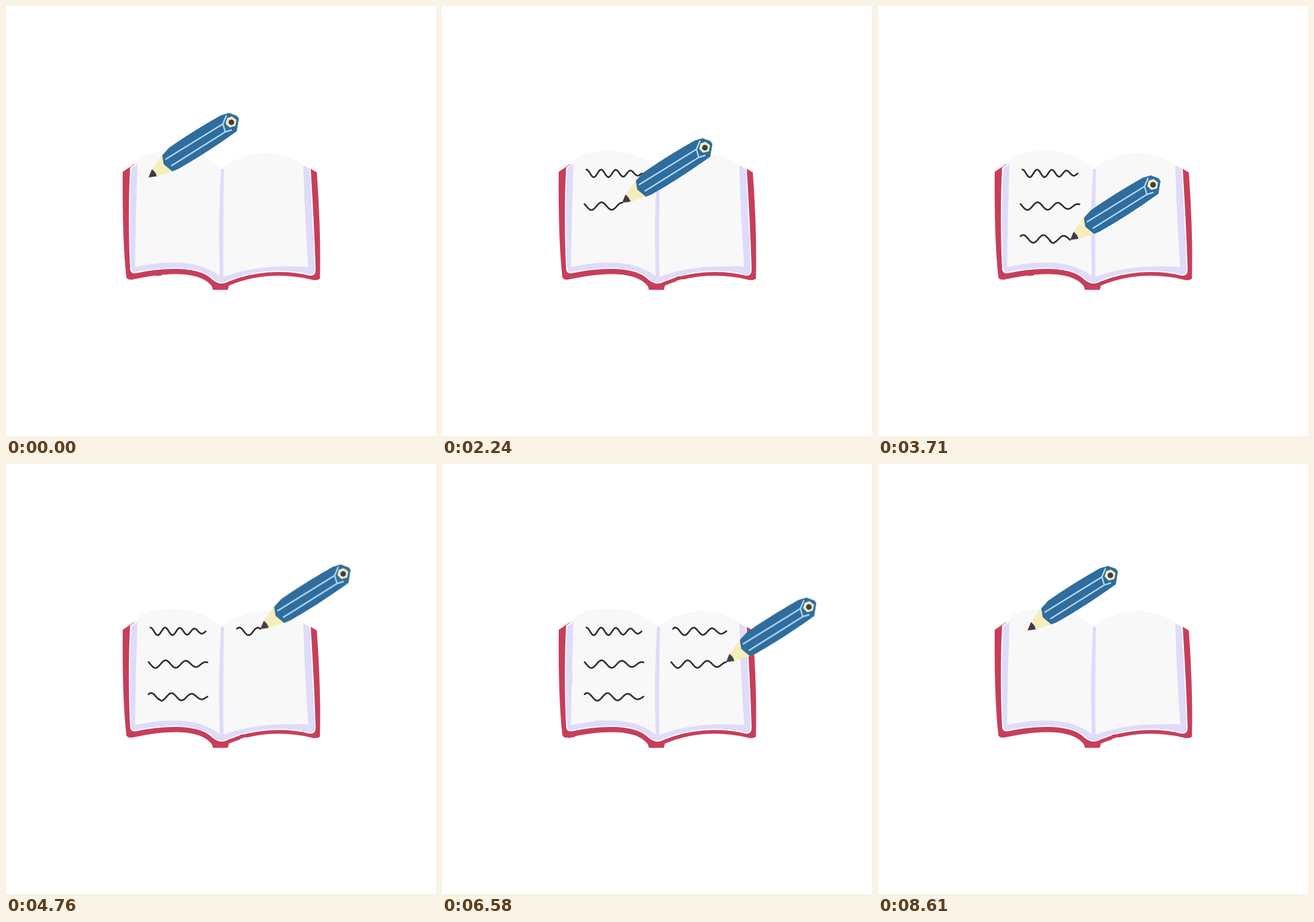
Write an HTML page that moves like this. It is 700 px wide and 700 px high and loops after 8.68 s.

```html
<!DOCTYPE html>
<html lang="en">
<head>
<meta charset="utf-8">
<title>Writing in a notebook</title>
<style>
  html, body { margin: 0; width: 100%; height: 100%; overflow: hidden; background: #fff; }
  svg { display: block; width: 100vw; height: 100vh; }
  .cover { fill: #c73e5b; }
  .edges { fill: #dfdbf9; stroke: #fff; stroke-width: 4; paint-order: stroke; stroke-linejoin: round; }
  .page { fill: #f9f8f8; }
  .ink { fill: none; stroke: #332d31; stroke-width: 2.7; stroke-linecap: round; stroke-linejoin: round; }
  .wood { fill: #f6edbc; }
  .lead { fill: #423b45; }
  .paint { fill: #2e6d9e; stroke: #2e6d9e; stroke-width: 1; stroke-linejoin: round; }
  .shine { fill: none; stroke: #b3d6ef; stroke-width: 2.4; stroke-linecap: round; stroke-linejoin: round; }
</style>
</head>
<body>
<svg viewBox="0 0 700 700">
  <defs>
    <filter id="boil" filterUnits="userSpaceOnUse" x="0" y="0" width="700" height="700" color-interpolation-filters="sRGB">
      <feTurbulence id="noise" type="fractalNoise" baseFrequency=".03" numOctaves="1"/>
      <feDisplacementMap in="SourceGraphic" scale="2" xChannelSelector="R" yChannelSelector="G"/>
    </filter>
  </defs>
  <g filter="url(#boil)">
    <path class="cover" d="M190 270L209 257L240 300H460L491 262L506 271Q513 370 511 444Q507 447 500 446C450 434 405 438 363 455L361 462H337L335 456C316 431 262 433 207 445Q199 447 196 442Q189 380 190 270Z"/>
    <path class="edges" d="M204 264L214 257L350 265L482 258L494 265Q500 360 502 429Q502 438 495 437C450 426 400 431 361 447Q347 455 334 441C310 422 260 423 211 433Q204 434 204 428Q200 340 204 264Z"/>
    <path class="page" d="M208 262Q215 245 233 240C280 230 325 238 350 265Q345 350 348 440C312 412 262 414 210 425Q211 340 214 257Z"/>
    <path class="page" d="M355 263C385 237 445 228 484 259Q486 340 492 425C445 422 400 424 354 441Q353 350 355 263Z"/>
    <path id="ink" class="ink"/>
    <g id="pencil">
      <path class="wood" d="M12 -8L39 -18L40 14L12 6Z"/>
      <path class="lead" d="M0 0L12 -8Q15 0 12 6Z"/>
      <path class="paint" d="M39 -17L55 -21Q100 -22 154 -18L167 -14L175 -3L175 2L161 17Q100 19 48 15L38 13L33 -4Z"/>
      <path class="shine" d="M40 -9L149 -5L161 -13M149 -5L145 8L155 11M42 5L145 8"/>
      <path class="wood" d="M153 -3L160 -9L168 -7L171 2L164 9L155 6Z"/>
      <circle class="lead" cx="162" cy=".5" r="4.6"/>
    </g>
  </g>
</svg>
<script>
const STEP = 70, STEPS = 124, FLY = 8050, ERASE = 8260;
const HOME = [232, 279], TILT = -33.8;

// When each line of writing begins and ends.
const spans = [[70, 1480], [1750, 2610], [2870, 3940], [4410, 5330], [5600, 6650], [7070, 8000]];

// Three rows on each of two pages; the middle row starts with a dip.
const lines = spans.map(([from, to], i) => {
  const row = i % 3, col = Math.floor(i / 3);
  return {
    from, to,
    x: 232 + 141 * col + (row ? 0 : 3),
    y: 272.5 + 53.3 * row,
    width: (row ? 96 : 90) - 3 * col,
    waves: i ? 2.9 : 3.75,
    dip: row === 1 ? .34 : .63
  };
});
lines[0].dip = .5;

const ink = document.getElementById("ink");
const pencil = document.getElementById("pencil");
const noise = document.getElementById("noise");

const clamp = v => Math.max(0, Math.min(1, v));
const smooth = u => u * u * (3 - 2 * u);
const mix = (a, b, u) => a.map((v, i) => v + (b[i] - v) * u);

// A wave that flattens towards its end.
function pointOn({ x, y, width, waves, dip }, u) {
  const height = 6.3 * (1 - .5 * u ** 3);
  return [x + width * u, y + height * Math.cos(2 * Math.PI * (waves * u - dip))];
}

const written = ({ from, to }, t) => 1 - (1 - clamp((t - from) / (to - from))) ** 1.2;

function stroke(line, part) {
  if (!part) return "";
  const count = Math.ceil(part * 60);
  return "M" + Array.from({ length: count + 1 }, (_, i) => pointOn(line, part * i / count)).join("L");
}

function bezier(a, b, c, d, u) {
  const ab = mix(a, b, u), bc = mix(b, c, u), cd = mix(c, d, u);
  return mix(mix(ab, bc, u), mix(bc, cd, u), u);
}

function tipAt(t) {
  let last = HOME, since = 0;
  for (const line of lines) {
    if (t < line.from) {
      return mix(last, pointOn(line, 0), smooth((t - since) / (line.from - since)));
    }
    if (t <= line.to) return pointOn(line, written(line, t));
    last = pointOn(line, 1);
    since = line.to;
  }
  const u = smooth(clamp((t - FLY) / (STEP * STEPS - FLY)));
  return bezier(last, [545, 130], [340, 200], HOME, u);
}

function draw(now) {
  const n = Math.floor(now / STEP) % STEPS, t = n * STEP;
  ink.setAttribute("d", t < ERASE ? lines.map(line => stroke(line, written(line, t))).join("") : "");
  pencil.setAttribute("transform", `translate(${tipAt(t)}) rotate(${TILT})`);
  noise.setAttribute("seed", 1 + Math.floor((n + 1) / 3) % 3);
}

const start = performance.now();
function tick() {
  draw(performance.now() - start);
  requestAnimationFrame(tick);
}
tick();
</script>
</body>
</html>
```
